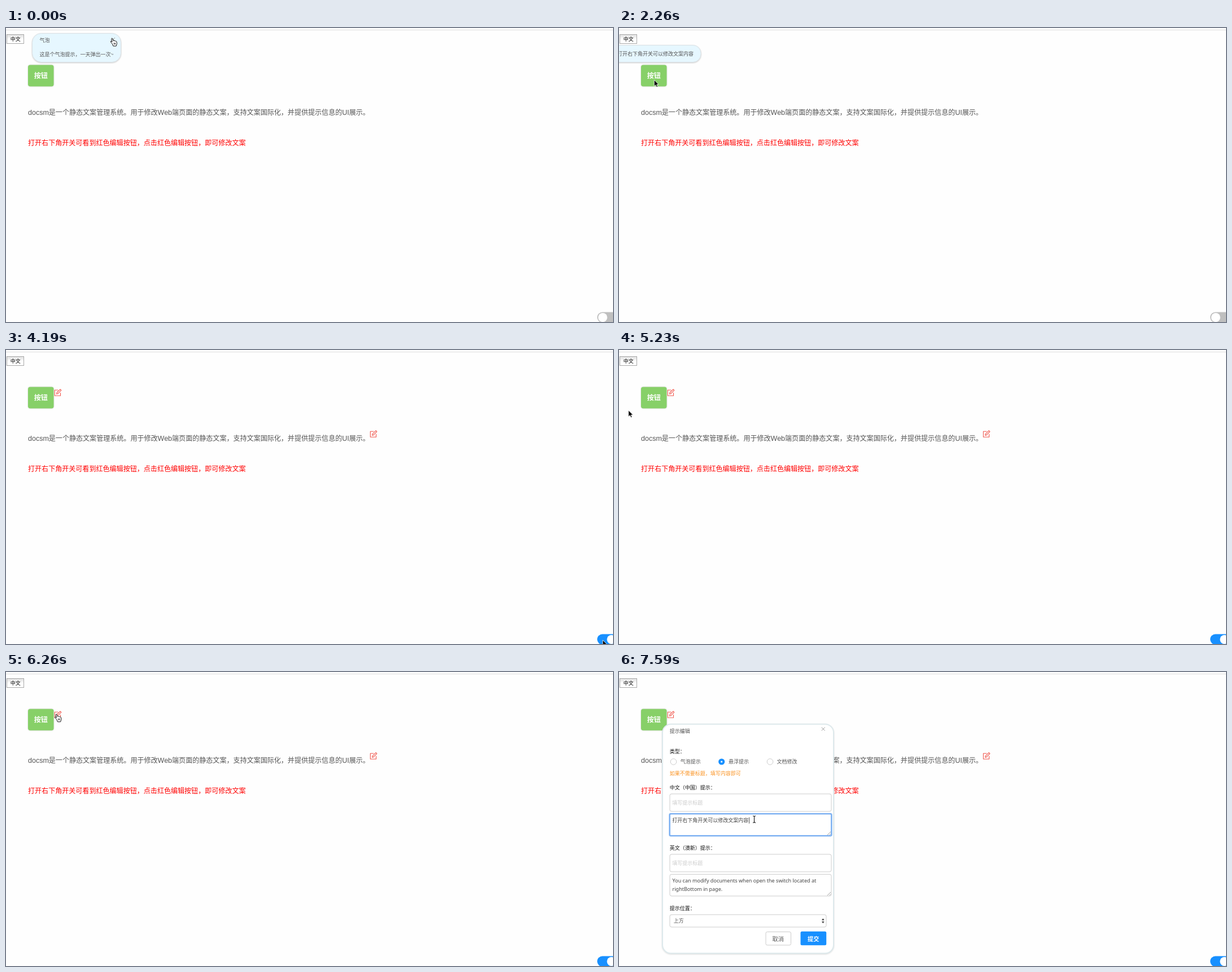
An HTML page that plays this animation: 1075 px wide and 521 px high, repeating every 8 s.

```html
<!DOCTYPE html>
<html lang="zh-CN">
<head>
<meta charset="utf-8">
<title>docsm</title>
<style>
  html, body { margin: 0; width: 100%; height: 100%; overflow: hidden; background: #fefefe; }
  svg { display: block; }
  text { font: 9px "Noto Sans CJK SC", "Noto Sans CJK", sans-serif; fill: #555; white-space: pre; }
  .body { font-size: 12.06px; }
  .latin { font-family: "Liberation Sans", sans-serif; font-size: 12.5px; }
  .en { font-family: "Noto Sans", sans-serif; font-size: 9.06px; fill: #444; }
  .btn { font-size: 10.2px; }
  .bold { fill: #fff; font-weight: 700; }
  .label { fill: #111; }
  .hint { fill: #ccc; }
  .field { fill: #fff; stroke: #ccc; }
  .bubble { fill: #e6f7ff; stroke: #d9e0e4; filter: drop-shadow(0 1px 1px #0003); }
  .thin { fill: none; stroke: #888; stroke-width: .8; }
</style>
</head>
<body>
<svg width="1075" height="521" viewBox="0 0 1075 521">
  <defs>
    <linearGradient id="shade" x2="0" y2="1">
      <stop offset=".1" stop-color="#e4e4e4"/><stop offset=".55" stop-color="#fff"/>
    </linearGradient>
    <g id="edit" fill="none" stroke="#f0564c" stroke-width="1.1" stroke-linejoin="round" stroke-linecap="round">
      <path d="M6.5 2H.8V12H11V7"/>
      <path d="M4 9l.5-2.5L10.6.6l1.7 1.7-6 6z"/>
    </g>
    <path id="close" class="thin" d="M-3 -3l6 6m0-6l-6 6"/>
    <g id="fields">
      <rect class="field" width="286" height="31" rx="3"/>
      <text class="hint" x="4.3" y="19">填写提示标题</text>
      <rect class="field" y="35.5" width="286" height="38.5" rx="3"/>
      <path class="thin" d="M279 73l6-6M282.500 73l2.500-2.500"/>
    </g>
  </defs>

  <rect width="1075" height="3" fill="#fff"/>
  <path d="M0 3.5H1075" stroke="#dcdcdc"/>
  <rect x="1.5" y="11.5" width="30" height="16" fill="url(#shade)" stroke="#aaa"/>
  <text x="7.7" y="22.8" style="fill:#000">中文</text>

  <g id="bubble">
    <rect class="bubble" x="46.5" y="9.5" width="157" height="51" rx="16"/>
    <text x="59.5" y="24.6">气泡</text>
    <text x="59.5" y="49.6">这是个气泡提示，一天弹出一次~</text>
    <use href="#close" x="190" y="20"/>
  </g>
  <g id="tip">
    <rect class="bubble" x="-16" y="30.5" width="161" height="30" rx="14"/>
    <text x="-3" y="49">打开右下角开关可以修改文案内容</text>
  </g>

  <rect x="39" y="65.5" width="45.5" height="38" rx="4" fill="#87d068" style="filter:drop-shadow(0 0 1px #0003)"/>
  <text class="body bold" x="49.7" y="89.2">按钮</text>

  <g id="copy">
    <text class="body" x="39" y="154"><tspan class="latin">docsm</tspan>是一个静态文案管理系统。用于修改<tspan class="latin">Web</tspan>端页面的静态文案，支持文案国际化，并提供提示信息的<tspan class="latin">UI</tspan>展示。</text>
    <text class="body" x="39" y="208.2" style="fill:#f00">打开右下角开关可看到红色编辑按钮，点击红色编辑按钮，即可修改文案</text>
  </g>
  <g id="icons">
    <use href="#edit" x="85.5" y="69"/>
    <use href="#edit" x="644.5" y="142.3"/>
  </g>

  <rect id="track" x="1047" y="503.5" width="36" height="18.5" rx="9.2"/>
  <circle id="knob" cy="513" r="8" fill="#fff"/>

  <g id="dialog">
    <rect x="77" y="92.5" width="303" height="406" rx="15" fill="#fff" stroke="#dde9ec" stroke-width="2" style="filter:drop-shadow(0 1px 1px #0002)"/>
    <text x="89.7" y="107.8">提示编辑</text>
    <use href="#close" x="361.7" y="101"/>

    <text class="label" x="89.7" y="143.8">类型：</text>
    <g fill="#fff" stroke="#ccc">
      <circle cx="96.5" cy="159" r="5.3"/>
      <circle cx="267.5" cy="159" r="5.3"/>
      <circle cx="181.7" cy="159" r="3.6" stroke="#1890ff" stroke-width="4"/>
    </g>
    <text x="108.7" y="162.3">气泡提示</text>
    <text x="194" y="162.3">悬浮提示</text>
    <text x="279.5" y="162.3">文档修改</text>
    <text x="89.7" y="183.4" style="fill:#fa9322">如果不需要标题，填写内容即可</text>

    <text class="label" x="89.7" y="208">中文（中国）提示：</text>
    <use href="#fields" x="90" y="216"/>
    <g id="focus">
      <rect x="89.7" y="251.2" width="286.6" height="39.1" rx="2" fill="none" stroke="#7fb2f2" stroke-width="2.6"/>
      <path d="M230.5 257.5v11" stroke="#222" stroke-width=".8"/>
    </g>
    <text x="94.3" y="266.2" style="fill:#444">打开右下角开关可以修改文案内容</text>

    <text class="label" x="89.7" y="315.2">英文（澳新）提示：</text>
    <use href="#fields" x="90" y="323"/>
    <text class="en" x="94.5" y="373.3">You can modify documents when open the switch located at</text>
    <text class="en" x="94.5" y="388.3">rightBottom in page.</text>

    <text class="label" x="89.7" y="422.3">提示位置：</text>
    <rect class="field" x="90" y="430" width="277" height="22" rx="3"/>
    <text x="96.7" y="444.3">上方</text>
    <path d="M359 440l2.3-3.5 2.3 3.5zM359 442l2.3 3.5 2.3-3.5z" fill="#444"/>

    <rect class="field" x="260" y="460.5" width="44.5" height="23.5" rx="2.5"/>
    <text class="btn" x="271.5" y="476.5">取消</text>
    <rect x="321.5" y="459.7" width="45.7" height="24.6" rx="2.5" fill="#1890ff"/>
    <text class="btn bold" x="334" y="476.5">提交</text>
  </g>

  <g id="pointer" stroke-linejoin="round">
    <path id="arrow" d="M.3 0V11.2L2.9 8.8 4.7 12.8 6.6 12 4.9 8.1H8.3Z" fill="#000" stroke="#fff" stroke-width=".8"/>
    <path id="hand" d="M-.2 9.6L-3 6.4Q-3.8 4.9-2.6 4.6L-.4 6.2-1.8 1.6Q-1.8 0-.6.1 0 .1.4 1.3L1.5 4.2Q2.9 3.2 3.5 4.4 5 3.6 5.4 4.9 7 4.3 7.4 6L7.9 9.2 6.6 13.5H1.4ZM2.6 7.8l.7 3M4.6 7.6l.5 3" fill="#fff" stroke="#111"/>
    <path id="beam" d="M-2.5 -6Q0 -6 0 -4.5 0 -6 2.5 -6M0 -4.5V4.5M-2.5 6Q0 6 0 4.5 0 6 2.5 6" fill="none" stroke="#111" stroke-width="1.1"/>
  </g>
</svg>
<script>
const LOOP = 8000, STEP = 148.8; // the screen is sampled once per STEP ms
const $ = id => document.getElementById(id);
const show = (id, on) => $(id).style.display = on ? '' : 'none';
const ease = p => p * p * (3 - 2 * p);

// Pointer rests and turns: step, x, y
const path = [
  [0, 188.5, 18.5], [7, 60.5, 110.5], [10, 60, 90], [15, 62, 92],
  [22, 1061, 516], [25, 1056.5, 514], [29, 1056.5, 514],
  [35, 16.5, 107], [37, 10, 87], [42, 90, 74.7], [43, 90, 74.7], [51, 239.5, 261]
];

function pointerAt(step) {
  const next = path.findIndex(key => key[0] > step);
  if (next < 0) return path[path.length - 1].slice(1);
  const [from, x0, y0] = path[next - 1], [to, x1, y1] = path[next];
  const p = ease((step - from) / (to - from));
  return [x0 + (x1 - x0) * p, y0 + (y1 - y0) * p];
}

function draw(t) {
  const step = Math.floor(t / STEP);
  const editing = t >= 4190, dialog = t >= 6550, typing = t >= 7440;
  const [x, y] = pointerAt(step);
  const overButton = x > 39 && x < 85 && y > 65 && y < 103;

  show('bubble', t < 150);
  show('tip', overButton);
  show('icons', editing);
  show('dialog', dialog);
  show('focus', typing);
  $('copy').setAttribute('transform', `translate(0 ${editing ? 7 : 0})`);
  $('track').setAttribute('fill', editing ? '#1890ff' : '#bfbfbf');
  $('knob').setAttribute('cx', editing ? 1072.3 : 1056.8);

  const overLink = step < 1 || (step >= 42 && !dialog);
  const shape = overLink ? 'hand' : dialog && y > 251 ? 'beam' : 'arrow';
  for (const id of ['arrow', 'hand', 'beam']) show(id, id === shape);
  $('pointer').setAttribute('transform', `translate(${x} ${y})`);
}

function tick() {
  draw(performance.now() % LOOP);
  requestAnimationFrame(tick);
}
tick();
</script>
</body>
</html>
```
